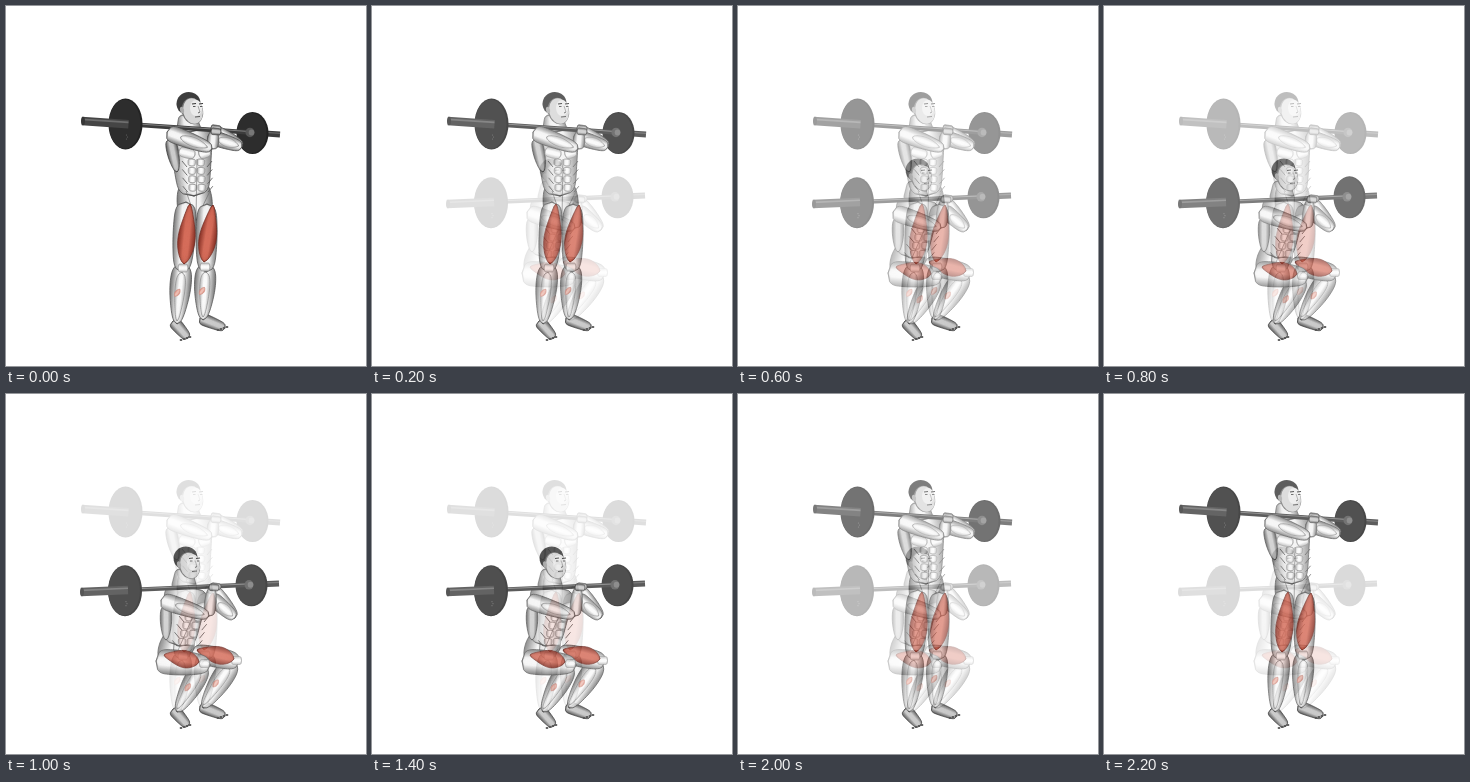
Animation of 360 by 360 pixels, one loop 2.4 s. Source, as an HTML page with a canvas:

```html
<!DOCTYPE html>
<html lang="en">
<head>
<meta charset="utf-8">
<title>Front squat</title>
<style>
html, body { margin: 0; width: 100%; height: 100%; overflow: hidden; background: #fff; }
canvas { display: block; width: 100%; height: 100%; }
</style>
</head>
<body>
<canvas id="stage"></canvas>
<script>
const SIZE = 360, LOOP = 2400, STEP = 200, HALF = LOOP / STEP / 2;
const dpr = window.devicePixelRatio || 1;

const SKIN = { edge: '#858585', mid: '#fcfcfc', line: '#484848' };
const PALE = { edge: '#c6c6c6', mid: '#ffffff', line: '#8a8a8a' };
const DARK = { edge: '#666666', mid: '#d2d2d2', line: '#383838' };
const RED = { edge: '#8e3529', mid: '#d9705d', line: '#6f2a21' };
const PINK = { edge: '#dc8a7a', mid: '#efc0b5', line: '#cf8e82' };

const FEET = {
  near: { ankle: [171, 315], heel: [167, 315], toe: [182, 332] },
  far: { ankle: [197, 311], heel: [194, 312], toe: [219, 322] }
};

const STAND = {
  head: [184, 102], neck: [183, 126], collar: [184, 122], waist: [188, 190], pelvis: [190, 214],
  sternum: [191, 153], navel: [192, 183], lat: [[164, 133], [171, 166]],
  bar: { from: [76, 115], to: [274, 128.5], left: [119.5, 118], right: [246.5, 127] },
  near: { shoulder: [161, 126], elbow: [206, 143], hand: [208, 125], hip: [180, 196], knee: [176, 266],
    thigh: [10, 8], quad: [[184, 198], [178, 258]], ...FEET.near },
  far: { shoulder: [202, 130], elbow: [236, 141], hand: [208, 122], hip: [201, 198], knee: [200, 266],
    thigh: [9, 8], quad: [[207, 199], [198, 256]], ...FEET.far }
};

const SQUAT = {
  head: [181, 168.5], neck: [178, 194], collar: [181, 192], waist: [173, 252], pelvis: [166, 270],
  sternum: [188, 220], navel: [180, 249], lat: [[160, 212], [160, 246]],
  bar: { from: [75, 198], to: [273, 189.5], left: [119, 196.7], right: [245.5, 191.3] },
  near: { shoulder: [155, 206], elbow: [203, 222], hand: [206, 193], hip: [150, 267], knee: [204, 271],
    thigh: [12, 8], quad: [[158, 261], [193, 268]], ...FEET.near },
  far: { shoulder: [205, 203], elbow: [229, 224], hand: [208, 192], hip: [186, 258], knee: [233, 268],
    thigh: [8, 8], quad: [[191, 256], [228, 265]], ...FEET.far }
};

const mix = (a, b, t) => [a[0] + (b[0] - a[0]) * t, a[1] + (b[1] - a[1]) * t];
const shift = (p, x, y) => [p[0] + x, p[1] + y];

function sheet(canvas) {
  canvas.width = canvas.height = SIZE * dpr;
  const c = canvas.getContext('2d');
  c.scale(dpr, dpr);
  c.fillStyle = '#fff';
  c.fillRect(0, 0, SIZE, SIZE);
  return c;
}

function line(c, a, b, color = '#666', width = 0.6) {
  c.beginPath();
  c.moveTo(...a);
  c.lineTo(...b);
  c.strokeStyle = color;
  c.lineWidth = width;
  c.stroke();
}

function oval(c, [x, y], rx, ry, fill, tilt = 0) {
  c.beginPath();
  c.ellipse(x, y, rx, ry, tilt, 0, 7);
  c.fillStyle = fill;
  c.fill();
}

// Belly from a to b: half widths w0 to w1, swollen by bulge where skew puts it
function muscle(c, a, b, w0, w1, bulge = 0, tone = SKIN, skew = 1) {
  const len = Math.hypot(b[0] - a[0], b[1] - a[1]), n = 24;
  const radius = t => (w0 + (w1 - w0) * t + bulge * Math.sin(Math.PI * t ** skew))
    * Math.sqrt(1 - Math.abs(2 * t - 1) ** 8);
  const side = (k, back) => {
    for (let i = 0; i <= n; i++) {
      const t = (back ? n - i : i) / n;
      c.lineTo(t * len, k * radius(t));
    }
  };
  const wide = Math.max(w0, w1, (w0 + w1) / 2 + bulge);
  const shade = c.createLinearGradient(0, -wide, 0, wide);
  shade.addColorStop(0, tone.edge);
  shade.addColorStop(0.35, tone.mid);
  shade.addColorStop(0.65, tone.mid);
  shade.addColorStop(1, tone.edge);

  c.save();
  c.translate(...a);
  c.rotate(Math.atan2(b[1] - a[1], b[0] - a[0]));
  c.beginPath();
  side(1);
  side(-1, true);
  c.closePath();
  c.fillStyle = shade;
  c.fill();
  c.strokeStyle = tone.line;
  c.lineWidth = 0.7;
  c.stroke();
  c.lineWidth = 0.4;
  const fibres = Math.ceil(wide * 0.9);
  for (let i = 1 - fibres; i < fibres; i++) {
    const k = i / fibres;
    c.globalAlpha = 0.1 + 0.4 * k * k;
    c.beginPath();
    side(k);
    c.stroke();
  }
  c.restore();
}

function leg(c, { hip, knee, ankle, heel, toe, thigh, quad }) {
  muscle(c, heel, toe, 6, 4, 0.5, DARK);
  for (let i = 0; i < 4; i++) oval(c, shift(toe, 2 - i * 3, i - 1), 1.4, 1.1, '#555');
  const shin = mix(knee, hip, 0.12);
  muscle(c, shin, shift(ankle, 0, 3), 8, 4, 4, SKIN, 0.8);
  muscle(c, mix(shin, ankle, 0.15), ankle, 3, 1.5, 2.5, PALE, 0.7);
  muscle(c, hip, knee, ...thigh, 2);
  const cap = mix(knee, quad[1], 0.5);
  muscle(c, shift(cap, -5, 0), shift(cap, 5, 0), 4, 4, 0, PALE);
  muscle(c, ...quad, 2, 3, 6, RED, 1.3);
  const tip = mix(shin, ankle, 0.5);
  muscle(c, shift(tip, 0, -3), shift(tip, -5, 4), 0.5, 0.5, 1.8, PINK);
}

function torso(c, { collar, waist, pelvis, sternum, navel, lat }) {
  muscle(c, mix(waist, collar, 0.2), pelvis, 14, 15, 3);
  muscle(c, collar, waist, 23, 15);
  muscle(c, ...lat, 5, 2, 2, DARK);
  for (const s of [-1, 1]) {
    const chest = shift(sternum, s * 2, -4);
    muscle(c, chest, shift(chest, s < 0 ? -16 : 11, -4), 4, 4, 1, PALE);
    for (let row = 0; row < 4; row++) {
      const p = mix(sternum, navel, row * 0.28);
      const pad = shift(p, s * (s < 0 ? 5 : 4), 0);
      muscle(c, pad, shift(pad, -0.5, 7), 3.5, 3, 0.5, PALE);
      line(c, shift(p, s * 10, 8), shift(p, s * 15, 2), '#555', 0.8);
    }
    line(c, shift(navel, s * 12, 2), pelvis);
  }
  line(c, sternum, pelvis);
}

function head(c, p, neck) {
  muscle(c, shift(p, -3, 6), neck, 8, 13);
  const at = (x, y) => shift(p, x, y);
  oval(c, at(-1.5, -4.5), 12, 11.5, '#3c3c3c', -0.2);
  oval(c, at(2.5, 3), 10.5, 13.5, '#777', -0.25);
  oval(c, at(3, 3), 9.8, 12.8, '#d6d6d6', -0.25);
  oval(c, at(6, 0), 6, 8, '#ebebeb');
  oval(c, at(-8, 2), 2, 3.4, '#aaa', -0.2);
  for (const x of [2, 9]) {
    line(c, at(x, -4), at(x + 4, -4.5), '#333', 1.1);
    line(c, at(x + 1, -1.5), at(x + 3.5, -1.5), '#444', 0.9);
  }
  line(c, at(8, -2), at(10, 4), '#777');
  line(c, at(10, 4), at(8, 5), '#555', 0.9);
  line(c, at(5, 9), at(10, 8.5), '#444', 0.9);
}

function plate(c, p, rx, ry) {
  oval(c, p, rx, ry, '#222');
  oval(c, shift(p, -0.8, 0), rx - 1.2, ry - 1, '#2d2d2d');
}

function barbell(c, { from, to, left, right }) {
  const on = x => mix(from, to, (x - from[0]) / (to[0] - from[0]));
  const rod = (a, b, width, color, glint) => {
    line(c, on(a), on(b), color, width);
    line(c, shift(on(a), 0, -width * 0.2), shift(on(b), 0, -width * 0.2), glint, width * 0.2);
  };
  rod(right[0], to[0], 6, '#3c3c3c', '#666');
  plate(c, right, 16, 21);
  rod(left[0], right[0] - 2, 4.4, '#3c3c3c', '#8a8a8a');
  oval(c, on(right[0] - 2.5), 4.5, 4.8, '#565656');
  oval(c, on(right[0] - 1), 2.8, 3, '#777');
  plate(c, left, 17, 25.5);
  rod(from[0], left[0] + 3, 8.6, '#454545', '#6e6e6e');
  oval(c, on(from[0] + 1), 2, 4.3, '#363636');
  for (let i = 0; i < 3; i++) oval(c, shift(left, 1 + i % 2, 11 + i * 2), 0.6, 0.6, '#666');
}

function arm(c, { shoulder, elbow, hand }, size) {
  muscle(c, elbow, hand, 5, 3.5, 1.5);
  muscle(c, shoulder, elbow, size, 5, 1);
  muscle(c, mix(shoulder, elbow, 0.3), mix(shoulder, elbow, 0.9), 2, 1, 3, PALE);
  muscle(c, shift(hand, -3, 0), shift(hand, 7, 1), 3.5, 3, 0, DARK);
}

function figure(c, pose) {
  torso(c, pose);
  leg(c, pose.far);
  leg(c, pose.near);
  head(c, pose.head, pose.neck);
  barbell(c, pose.bar);
  arm(c, pose.far, 7);
  arm(c, pose.near, 8.5);
}

function render(pose) {
  const canvas = document.createElement('canvas');
  figure(sheet(canvas), pose);
  return canvas;
}

const up = render(STAND), down = render(SQUAT);
const ctx = sheet(document.getElementById('stage'));
const start = performance.now();

// Stepped crossfade between the two poses, there and back
function frame(now) {
  const step = Math.floor(Math.max(0, now - start) % LOOP / STEP);
  ctx.globalAlpha = 1;
  ctx.drawImage(up, 0, 0, SIZE, SIZE);
  ctx.globalAlpha = 1 - Math.abs(step - HALF) / HALF;
  ctx.drawImage(down, 0, 0, SIZE, SIZE);
  requestAnimationFrame(frame);
}
frame(start);
</script>
</body>
</html>
```
